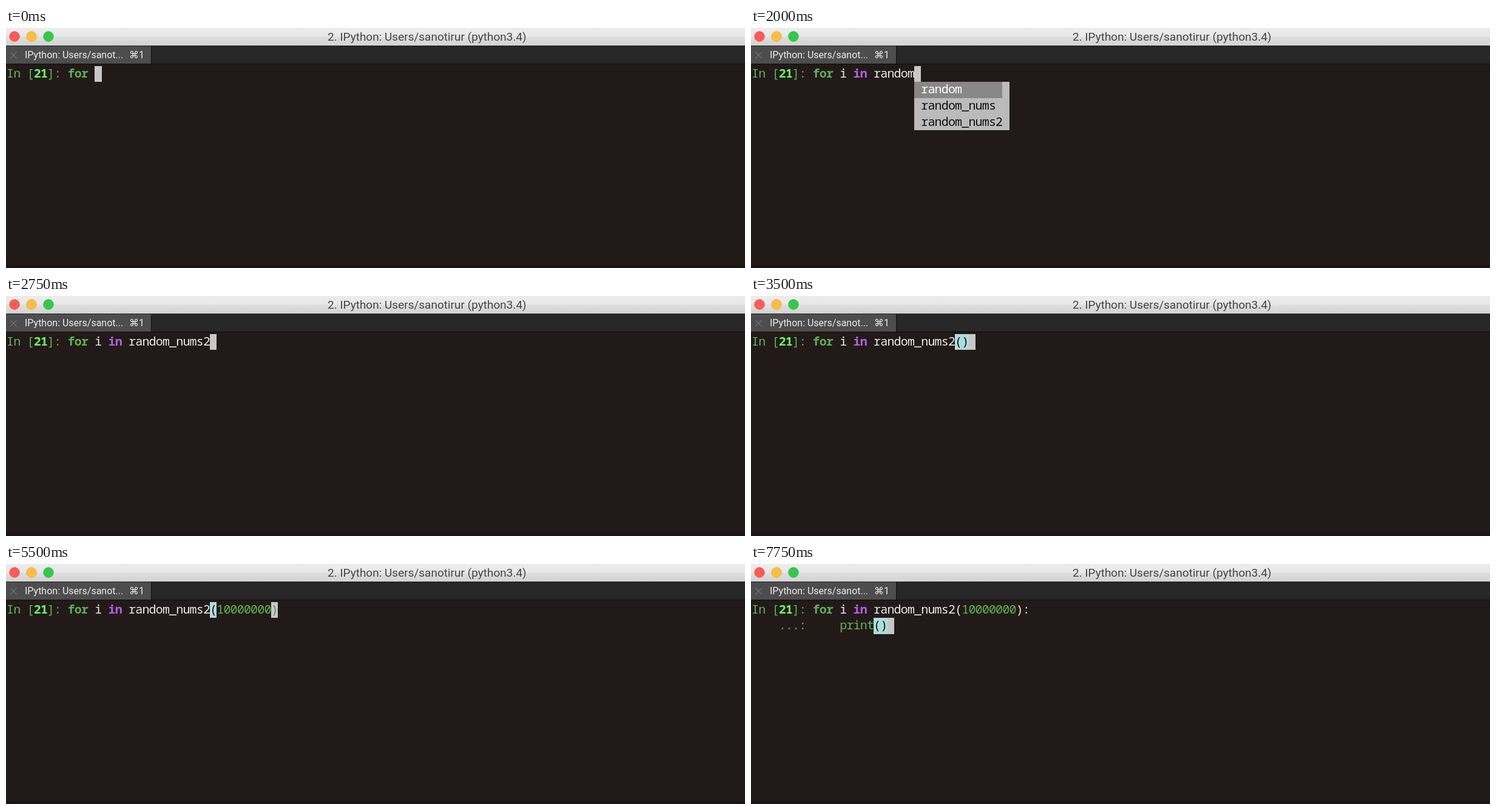
An HTML page that plays this animation: 1218x397 px, repeating every 8 s.

```html
<!DOCTYPE html>
<html lang="en">
<head>
<meta charset="utf-8">
<title>Terminal session</title>
<style>
  html, body { margin: 0; width: 100%; height: 100%; overflow: hidden; background: #221a18; }
  #stage { position: absolute; left: 0; top: 0; width: 1218px; height: 397px; overflow: hidden; background: #221a18; }
  #stage div, #stage svg, #term span { position: absolute; white-space: pre; }
  .ui { font-family: Roboto, "DejaVu Sans", sans-serif; }
  #title {
    left: 0; top: 0; width: 1218px; height: 29px;
    background: linear-gradient(#ececec, #e8e8e8 48%, #dedede 52%, #d3d3d3);
  }
  #title .ui { left: 530px; top: 0; font-size: 19px; line-height: 30px; color: #454545; }
  #tabs { left: 0; top: 29px; width: 1218px; height: 30px; background: #272727; border-bottom: 1px solid #0b0909; }
  #tab { left: 0; top: 1px; width: 239px; height: 29px; background: #4d4d4d; border-right: 1px solid #0e0e0e; }
  #tab .ui { top: 0; font-size: 16px; line-height: 29px; color: #ececec; }
  #foot { left: 0; top: 392px; width: 1218px; height: 5px; background: #1c1516; }
  #term span {
    height: 26.6px; line-height: 24.6px; text-indent: -.2px;
    font-family: "Noto Sans Mono", "DejaVu Sans Mono", monospace;
    font-size: 20px; letter-spacing: -.833px; color: #ebe9e8;
  }
  #term .green { color: #61b35b; }
  #term .key { color: #5fae59; font-weight: 700; }
  #term .count { color: #6bfa6b; font-weight: 700; }
  #term .op { color: #b661e6; font-weight: 700; }
  #term .match { background: #aedcdb; color: #111; }
  #term .cursor { background: #c7c7c7; color: #777; }
  #term .item { background: #bbb; color: #111; }
  #term .picked { background: #878787; color: #fff; }
</style>
</head>
<body>
<div id="stage">
  <div id="title">
    <svg width="90" height="29" style="left:0;top:0" stroke-width="1">
      <circle cx="14" cy="14" r="8.2" fill="#fc5b57" stroke="#e9514b"/>
      <circle cx="42" cy="14" r="8.2" fill="#fdbe41" stroke="#e9ab38"/>
      <circle cx="70" cy="14" r="8.2" fill="#35c94b" stroke="#2db53f"/>
    </svg>
    <div class="ui">2. IPython: Users/sanotirur (python3.4)</div>
  </div>
  <div id="tabs">
    <div id="tab">
      <svg width="26" height="28" style="left:0;top:0"><path d="M7 9.5l11 11m0-11l-11 11" stroke="#8c8c8c" stroke-width="1"/></svg>
      <div class="ui" style="left:31px">IPython: Users/sanot...</div>
      <div class="ui" style="left:203px">⌘1</div>
    </div>
  </div>
  <div id="foot"></div>
  <div id="term"></div>
</div>
<script>
const STEP = 250, LOOP = 8000;
const LEFT = 1.3, TOP = 62.8, COL = 11.167, ROW = 26.6;
const INDENT = 9, MENU_COL = 24;
const words = ['random', 'random_nums', 'random_nums2'];
const styles = { for: 'key', in: 'op', print: 'green' };

const head = 'for i in ', call = head + words[2];
const full = call + '(10000000):';
const steps = [];
// "|" marks the cursor; menu is the chosen completion
const add = (text, menu = -1) => steps.push({ text, menu });

for (let n = 4; n <= head.length; n++) add(head.slice(0, n) + '|');
for (const part of ['r', 'rand']) add(head + part + '|');
words.forEach((word, k) => add(head + word + '|', k));
for (const tail of ['|', '|', '(|', '()|', '(|)', '(1|)', '(100|)']) add(call + tail);
for (let zeros = 3; zeros <= 7; zeros++) add(`${call}(1${'0'.repeat(zeros)}|)`);
add(full.slice(0, -1) + '|');
add(full + '|');
add(full + '|');
for (const part of ['', 'pr', 'pri', 'print', 'print(', 'print()']) add(`${full}\n    ${part}|`);

const term = document.getElementById('term');

function put(row, col, text, cls, size = text.length) {
  const el = document.createElement('span');
  el.className = cls;
  el.textContent = text;
  el.style.left = LEFT + col * COL + 'px';
  el.style.top = TOP + row * ROW + 'px';
  el.style.width = size * COL + 'px';
  term.append(el);
}

function drawLine(line, row) {
  const at = line.indexOf('|');
  const code = line.replace('|', '');
  for (const m of code.matchAll(/[A-Za-z_]\w*|\d+|[^\s\w]/g)) {
    const cls = styles[m[0]] || (/^\d/.test(m[0]) ? 'green' : '');
    put(row, INDENT + m.index, m[0], cls);
  }
  if (at < 0) return;
  const open = code.indexOf('('), close = code.indexOf(')');
  if (close >= 0 && (at === close || at === close + 1)) {
    put(row, INDENT + open, '(', 'match');
    put(row, INDENT + close, ')', 'match');
  }
  put(row, INDENT + at, code[at] || ' ', 'cursor');
}

function drawMenu(picked) {
  words.forEach((word, k) => {
    put(k + 1, MENU_COL, '', 'item', 14);
    put(k + 1, MENU_COL, ' ' + word, k === picked ? 'picked' : 'item', 13);
  });
}

function render({ text, menu }) {
  term.replaceChildren();
  put(0, 0, 'In [', 'green');
  put(0, 4, '21', 'count');
  put(0, 6, ']:', 'green');
  const lines = text.split('\n');
  if (lines.length > 1) put(1, 4, '...:', 'green');
  lines.forEach(drawLine);
  if (menu >= 0) drawMenu(menu);
}

let shown = -1;
function tick() {
  const k = Math.floor(performance.now() % LOOP / STEP);
  if (k !== shown) render(steps[shown = k]);
  requestAnimationFrame(tick);
}
tick();
</script>
</body>
</html>
```
